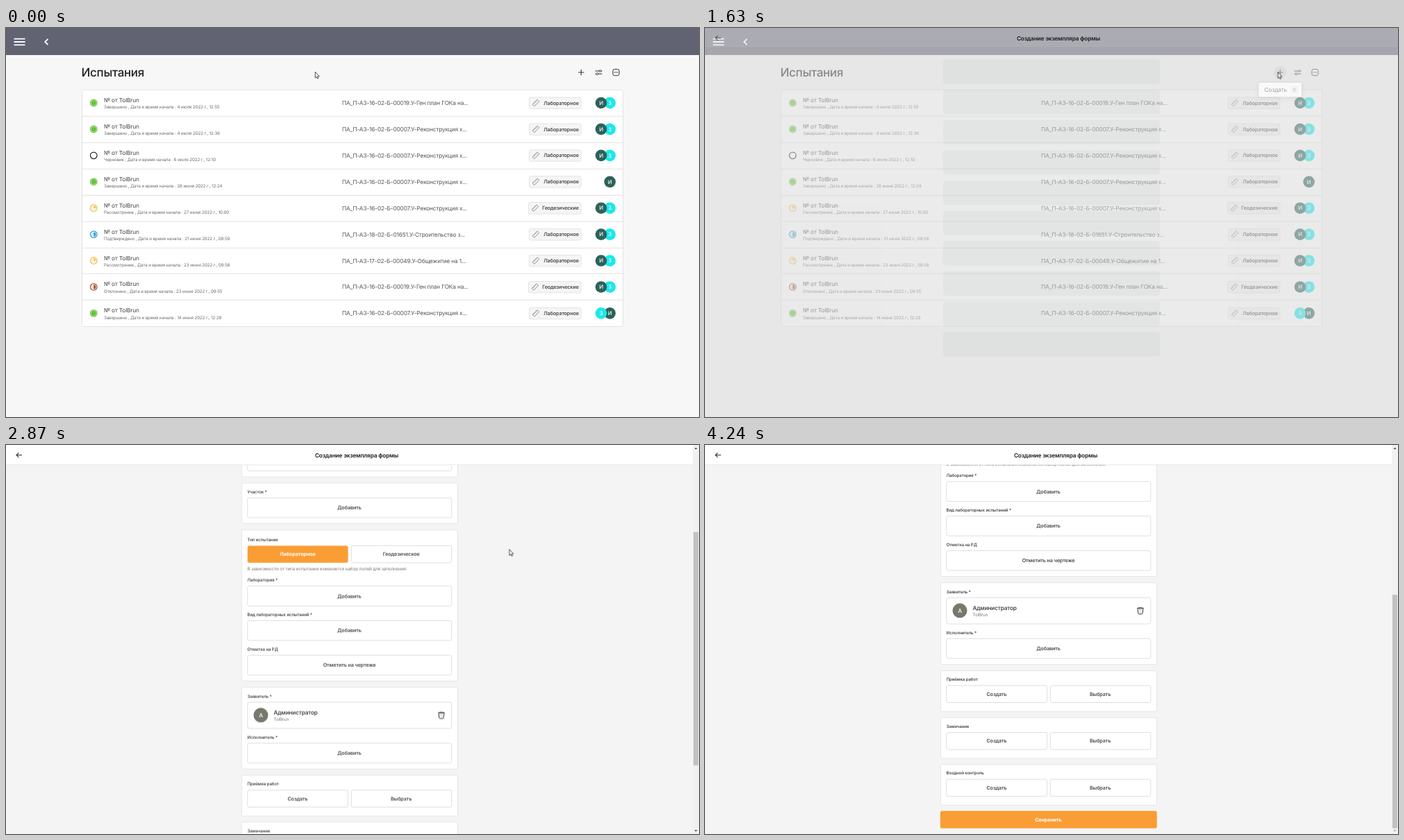
Animation, 998 px wide and 561 px high, one loop 4340 ms. Source, as an HTML page:

```html
<!DOCTYPE html>
<html lang="ru">
<head>
<meta charset="utf-8">
<title>Создание экземпляра формы</title>
<style>
html, body { margin: 0; width: 100%; height: 100%; overflow: hidden; background: #f7f7f7; }
svg { display: block; width: 100%; height: 100%; }
text { font-family: Inter, "Noto Sans", sans-serif; letter-spacing: -.02em; text-rendering: geometricPrecision; white-space: pre; }
.anim { animation-duration: 4340ms; animation-iteration-count: infinite; animation-timing-function: linear; }

.menu { animation-name: menu; }
@keyframes menu { 0%, 29.2% { opacity: 0 } 32.3%, 100% { opacity: 1 } }
.scrim { animation-name: scrim; }
@keyframes scrim { 0%, 34.8% { opacity: 0 } 37.6%, 100% { opacity: .115 } }
.loading { animation-name: loading; }
@keyframes loading { 0%, 35.2% { opacity: 0 } 39.9%, 100% { opacity: 1 } }
.caption { animation-name: caption; }
@keyframes caption { 0%, 35.2% { opacity: 0 } 37.5%, 100% { opacity: 1 } }
.form { animation-name: form; animation-timing-function: step-end; }
@keyframes form { 0% { opacity: 0 } 40.6%, 100% { opacity: 1 } }

.scroll { --ratio: -1; animation-name: scroll; }
.thumb { --ratio: .6; animation-name: scroll; }
@keyframes scroll {
  0%, 61.2% { transform: translateY(0); animation-timing-function: cubic-bezier(.33, 0, .67, .77); }
  66.13% { transform: translateY(calc(193.7px * var(--ratio))); animation-timing-function: cubic-bezier(.33, .42, .67, .91); }
  71.66% { transform: translateY(calc(311.7px * var(--ratio))); animation-timing-function: cubic-bezier(.33, .57, .67, 1); }
  81.6%, 100% { transform: translateY(calc(345px * var(--ratio))); }
}
.up { animation-name: up; animation-timing-function: step-end; }
@keyframes up { 0% { fill: #a8a8a8 } 61.5%, 100% { fill: #505050 } }
.down { animation-name: down; animation-timing-function: step-end; }
@keyframes down { 0% { fill: #505050 } 81.3%, 100% { fill: #a8a8a8 } }

.cursor-x { animation-name: cursor-x; }
@keyframes cursor-x {
  0%, 4.6% { transform: translateX(445px); animation-timing-function: cubic-bezier(.42, 0, .6, .95); }
  16.4%, 17% { transform: translateX(787px); animation-timing-function: ease-out; }
  21.2% { transform: translateX(811.5px); animation-timing-function: ease-in-out; }
  28.8%, 47% { transform: translateX(824.7px); animation-timing-function: ease-in-out; }
  59.2%, 61% { transform: translateX(735px); animation-timing-function: ease-out; }
  66.1% { transform: translateX(724.6px); }
  71.7%, 93% { transform: translateX(721.6px); animation-timing-function: ease-in; }
  97.6%, 100% { transform: translateX(127px); }
}
.cursor-y { animation-name: cursor-y; }
@keyframes cursor-y {
  0%, 4.6% { transform: translateY(63px); animation-timing-function: ease-in-out; }
  10.6% { transform: translateY(86px); animation-timing-function: ease-in-out; }
  16.4%, 17% { transform: translateY(61px); }
  21.2% { transform: translateY(62.5px); }
  28.8%, 47% { transform: translateY(63.4px); animation-timing-function: ease-in-out; }
  59.2%, 61% { transform: translateY(136px); animation-timing-function: ease-out; }
  66.1% { transform: translateY(150.2px); }
  71.7%, 93% { transform: translateY(153.3px); animation-timing-function: ease-in; }
  97.6%, 100% { transform: translateY(366px); }
}
.cursor { animation-name: cursor; animation-timing-function: step-end; }
@keyframes cursor { 0% { opacity: 1 } 97.6%, 100% { opacity: 0 } }
</style>
</head>
<body>
<svg id="stage" viewBox="0 0 998 561" preserveAspectRatio="none"></svg>
<script>
const SMALL = 6.24, BASE = 7.28, LARGE = 8.32;
const BRAND = 'TolBrun';
const ORANGE = '#fa9d35';

// Text is placed by the vertical centre of its capitals.
const text = (x, cy, str, { size = BASE, weight = 400, fill = '#333', anchor = 'start' } = {}) =>
  `<text x="${x}" y="${cy + size * .36}" font-size="${size}" font-weight="${weight}" fill="${fill}" text-anchor="${anchor}">${str}</text>`;
const box = (x, y, w, h, fill = '#fff', stroke = 'none', r = 2.5) =>
  `<rect x="${x}" y="${y}" width="${w}" height="${h}" rx="${r}" fill="${fill}" stroke="${stroke}"/>`;
const disc = (x, y, r, fill, stroke = 'none', width = 1) =>
  `<circle cx="${x}" cy="${y}" r="${r}" fill="${fill}" stroke="${stroke}" stroke-width="${width}"/>`;
const line = (d, stroke, width) =>
  `<path d="${d}" fill="none" stroke="${stroke}" stroke-width="${width}"/>`;
const group = (name, content) => `<g class="anim ${name}">${content}</g>`;
const avatar = (x, y, letter, r, fill, size = 7.8) =>
  disc(x, y, r, fill) + text(x, y, letter, { size, weight: 500, fill: '#fff', anchor: 'middle' });

// List of tests
const STATUS = {
  done: ['Завершено', '#68c23c'],
  draft: ['Черновик', '#22252e'],
  review: ['Рассмотрение', '#efbd45'],
  agreed: ['Подтверждено', '#2f9bd8'],
  declined: ['Отклонено', '#a3532f'],
};
const PLAN = '16-02-Б-00019.У-Ген план ГОКа на...';
const REBUILD = '16-02-Б-00007.У-Реконструкция х...';
const LAB = 'Лабораторное', GEO = 'Геодезические';
const ROWS = [
  ['done', '4 июля 2022 г., 12:55', PLAN, LAB, 'ИЗ'],
  ['done', '4 июля 2022 г., 12:36', REBUILD, LAB, 'ИЗ'],
  ['draft', '6 июля 2022 г., 12:10', REBUILD, LAB, 'ИЗ'],
  ['done', '28 июня 2022 г., 12:24', REBUILD, LAB, 'И'],
  ['review', '27 июня 2022 г., 10:00', REBUILD, GEO, 'ИЗ'],
  ['agreed', '21 июня 2022 г., 09:59', '18-02-Б-01651.У-Строительство з...', LAB, 'ИЗ'],
  ['review', '23 июня 2022 г., 09:58', '17-02-Б-00049.У-Общежитие на 1...', LAB, 'ИЗ'],
  ['declined', '23 июня 2022 г., 09:55', PLAN, GEO, 'ИЗ'],
  ['done', '14 июня 2022 г., 12:29', REBUILD, LAB, 'ЗИ'],
];

function statusIcon(kind, y) {
  const x = 126.3, color = STATUS[kind][1];
  const ring = disc(x, y, 4.8, '#fff', color, 1.2);
  if (kind === 'draft') return ring;
  if (kind === 'done') return ring + disc(x, y, 3.7, color);
  const arc = kind === 'review' ? `A3.2 3.2 0 0 1 ${x + 3.2} ${y}` : `A3.2 3.2 0 0 1 ${x} ${y + 3.2}`;
  return ring + disc(x, y, 3.4, color + '30') + `<path d="M${x} ${y}V${y - 3.2}${arc}Z" fill="${color}"/>`;
}

function chip(label, y) {
  const left = label === GEO ? 752.5 : 753.5;
  const ruler = `<g transform="translate(${left + 9.5} ${y}) rotate(-45)" fill="none" stroke="#666" stroke-width=".7">
    <rect x="-5" y="-1.9" width="10" height="3.8" rx=".6"/><path d="M-2.6-1.9v1.6M0-1.9v1.6M2.6-1.9v1.6"/></g>`;
  return box(left, y - 8, 828 - left, 16.4, '#f5f5f5', '#e4e4e4', 2) + ruler +
    text(824.8, y, label, { weight: 500, fill: '#333', anchor: 'end' });
}

function row([kind, date, project, type, people], i) {
  const y = 108 + 37.92 * i;
  const colors = { И: '#2d625b', З: '#1ce8ec' };
  const faces = [...people].reverse().map((who, n) => avatar(869.7 - 12.7 * n, y, who, 8.3, colors[who])).join('');
  return (i ? line(`M109.5 ${Math.round(y - 19) + .3}H888.5`, '#e2e2e2', 1) : '') +
    statusIcon(kind, y) +
    text(141, y - 4, `№ от ${BRAND}`, { size: LARGE, fill: '#444' }) +
    text(141, y + 6, `${STATUS[kind][0]} , Дата и время начала : ${date}`, { size: SMALL, fill: '#6a6a6a' }) +
    text(484, y, `ПА_П-АЗ-${project}`, { size: LARGE, fill: '#555' }) +
    chip(type, y) + faces;
}

const menu = group('menu',
  `<g style="filter:drop-shadow(0 1px 3px #0003)">${box(797.5, 79, 61.5, 20.3, '#fff', 'none', 2)}</g>` +
  text(805.5, 89.3, 'Создать', { size: LARGE, fill: '#555' }) +
  box(844, 84.3, 10, 10, '#f0f0f0', 'none', 2) +
  text(849, 89.3, 'C', { size: 5.8, fill: '#666', anchor: 'middle' }));

const toolbar =
  group('menu', disc(828.3, 64, 9.3, '#e2e2e2')) +
  line('M828.3 59.8v8.4M824.1 64h8.4', '#333', 1.1) +
  line('M848.5 62h10M848.5 66.2h10', '#333', 1) +
  disc(855.5, 62, 1.5, '#f7f7f7', '#333', .9) + disc(851.5, 66.2, 1.5, '#f7f7f7', '#333', .9) +
  `<rect x="873.9" y="59.4" width="9.2" height="9.2" rx="2.6" fill="none" stroke="#333"/>` +
  [876.3, 878.5, 880.7].map(x => disc(x, 64, .75, '#333')).join('');

const list =
  box(0, 0, 998, 561, '#f7f7f7', 'none', 0) + box(0, 0, 998, 39, '#616372', 'none', 0) +
  line('M11.5 15.6h16M11.5 20h16M11.5 24.4h16', '#fff', 1.8) +
  line('M60.5 15.8L56.2 20l4.3 4.2', '#fff', 1.8) +
  text(108.6, 64.2, 'Испытания', { size: 17, weight: 500, fill: '#222' }) + toolbar +
  box(109.5, 89.3, 779, 341.2, '#fff', '#e4e4e4', 2) + ROWS.map(row).join('');

// Shared page heading
const backArrow = line('M23 14.5H15M18.4 11.2L15 14.5l3.4 3.3', '#333', 1.1);
const caption = centre =>
  text(centre, 14.8, 'Создание экземпляра формы', { size: LARGE, weight: 600, fill: '#1c1c1c', anchor: 'middle' });
const headerBar = width => box(0, 0, width, 28.3, '#fff', 'none', 0) + line(`M0 28.6H${width}`, '#e2e2e2', .8);

const skeleton = Array.from({ length: 10 }, (_, i) => box(343, 45.3 + 43.65 * i, 312, 35.5, '#e3e8e6', 'none', 4)).join('');
const loading =
  group('scrim', box(0, 0, 998, 561, '#000', 'none', 0)) + menu +
  group('loading', box(0, 0, 998, 561, '#f4f4f4', 'none', 0) + headerBar(998) + backArrow + skeleton) +
  group('caption', caption(509));

// Form
const card = (top, bottom) => box(339.3, top, 311.2, bottom - top, '#fff', '#e5e5e5', 2.5);
const label = (y, str) => text(347.6, y, str, { size: 6.16, weight: 500, fill: '#333' });
const hint = (y, str) => text(347.6, y, str, { size: 6.38, fill: '#777' });
const middle = (x, y, str, fill, weight) => text(x, y, str, { fill, weight, anchor: 'middle' });
const button = (y, str) => box(347.8, y, 294, 28.6, '#fff', '#dedede') + middle(494.6, y + 14.2, str, '#4c4c4c', 600);
const input = (y, str) => box(347.8, y, 294, 28.6, '#fff', '#dedede') + text(354.8, y + 14.4, str, { size: LARGE, fill: '#9b9b9b' });

function pair(y, left, right, fill = '#fff', leftInk = '#4c4c4c', rightInk = '#4c4c4c') {
  const plain = fill === '#fff';
  return box(347.8, y, 144.8, 24.6, fill, plain ? '#dedede' : 'none') +
    box(497.3, y, 144.5, 24.6, '#fff', '#dedede') +
    middle(420, y + 12.2, left, leftInk, plain ? 600 : 700) + middle(569.2, y + 12.2, right, rightInk, 600);
}

const linked = (top, title) => card(top, top + 58.8) + label(top + 12.5, title) + pair(top + 21.4, 'Создать', 'Выбрать');

const person =
  box(347.8, 565.2, 294, 37.8, '#fff', '#dedede') + avatar(367, 583.8, 'А', 10.5, '#76796c', LARGE) +
  text(385.5, 579.8, 'Администратор', { size: LARGE, weight: 500, fill: '#333' }) +
  text(385.5, 590, BRAND, { size: SMALL, fill: '#777' }) +
  `<path d="M622.8 580.3q4.2-1.8 8.4 0l-1 7.4q-.2 1.1-1.3 1.1h-3.8q-1.1 0-1.3-1.1zM622.8 580.3q4.2 1.7 8.4 0" fill="#e8e8e8" stroke="#444" stroke-width="1"/>`;

const fields =
  card(38, 123) + label(51.7, 'Статус заявителя') +
  pair(60.6, 'Не готов к испытанию', 'Готов к испытанию', '#b63b31', '#7d211c', '#a6a6a6') +
  hint(93.3, 'Чтобы ваше испытание отправилась на рассмотрение, измените статус на «Готов к испытанию».') +
  hint(101.7, 'Для этого нужно заполнить все обязательные поля. Если вы пока не можете это сделать,') +
  hint(110.1, 'сохраните испытание в статусе «Не готов к испытанию» и завершите заполнение позже.') +
  card(132, 240.3) +
  label(144.3, 'Дата и время проведения испытания *') + input(153, 'Выберите дату и время') +
  label(194.2, 'Срок предоставления результатов испытания *') + input(202.9, 'Выберите срок') +
  card(249, 307.5) + label(261.8, 'Участок *') + button(270.4, 'Добавить') +
  card(316.8, 534.6) + label(330.6, 'Тип испытания') +
  pair(339.4, LAB, 'Геодезическое', ORANGE, '#fff') +
  hint(372.4, 'В зависимости от типа испытания изменяется набор полей для заполнения.') +
  label(389, 'Лаборатория *') + button(397.7, 'Добавить') +
  label(438.9, 'Вид лабораторных испытаний *') + button(447.5, 'Добавить') +
  label(488.8, 'Отметка на РД') + button(497.4, 'Отметить на чертеже') +
  card(543.6, 661.4) + label(556.3, 'Заявитель *') + person +
  label(615.6, 'Исполнитель *') + button(624.2, 'Добавить') +
  linked(670.5, 'Приёмка работ') + linked(738.2, 'Замечание') + linked(805.7, 'Входной контроль') +
  box(338.8, 872.8, 312, 25, ORANGE, 'none', 2.5) + middle(494.4, 885.2, 'Сохранить', '#fff', 700);

const scrollbar =
  box(989, 0, 9, 561, '#f1f1f1', 'none', 0) +
  group('thumb', box(990, 9, 7, 336.5, '#c1c1c1', 'none', 0)) +
  '<path class="anim up" d="M991.4 6l2.1-2.6 2.1 2.6z"/><path class="anim down" d="M991.4 555.2l2.1 2.6 2.1-2.6z"/>';

const form = group('form',
  box(0, 0, 998, 561, '#f4f4f4', 'none', 0) + group('scroll', fields) +
  headerBar(989) + backArrow + caption(505) + scrollbar);

const cursor = group('cursor-x', group('cursor-y', group('cursor',
  '<path d="M.3 .3V9L2.2 7.3l1.3 2.8 1.4-.6-1.3-2.8h2.6z" fill="#fff" stroke="#222" stroke-width=".8"/>')));

document.getElementById('stage').innerHTML = list + loading + form + cursor;
</script>
</body>
</html>
```
